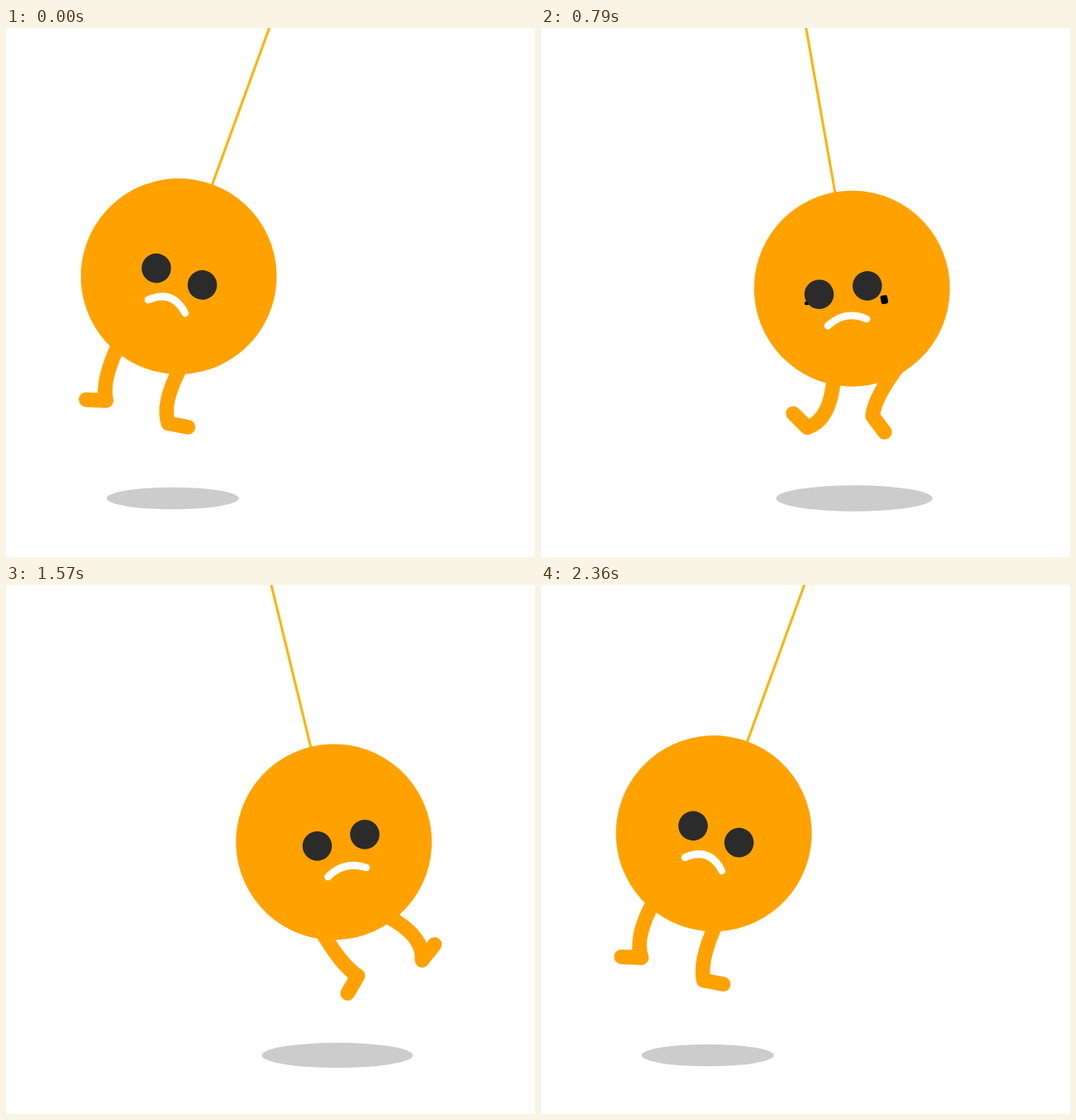
These frames come from a looping animation (640x640 px, 2.43 s). An HTML page with a canvas:

```html
<!DOCTYPE html>
<html lang="en">
<head>
<meta charset="utf-8">
<title>Swinging ball</title>
<style>
html, body { margin: 0; width: 100%; height: 100%; overflow: hidden; background: #fff; }
canvas { display: block; width: 100vw; height: 100vh; }
</style>
</head>
<body>
<canvas id="stage" width="640" height="640"></canvas>
<script>
const ctx = document.getElementById('stage').getContext('2d');

const LOOP = 2430, FPS = 14, STEPS = 34;
const PIVOT = { x: 320, y: -4 }, ROPE = 324.1, RADIUS = 118.5;
const ORANGE = '#ffa200', DARK = '#2b2b2b';

// Keys are [step, value] pairs
const SWING = [[0, -20.03], [17.25, 20.2], [33.3, -20.03]];
const STRIDE = [[0, 9], [9.5, -46], [17.2, 11], [26.5, 46.3], [33.4, 9]];

const clamp = (v, lo = 0, hi = 1) => Math.min(hi, Math.max(lo, v));
const smooth = x => x * x * (3 - 2 * x);
const wave = (step, shift) => Math.sin(2 * Math.PI * (step - shift) / STEPS);

// Symmetric cubic-bezier(h, 0, 1 - h, 1)
function ease(x, h = 0.48) {
  let lo = 0, hi = 1;
  for (let n = 0; n < 24; n++) {
    const s = (lo + hi) / 2, q = 1 - s;
    const bx = 3 * q * q * s * h + 3 * q * s * s * (1 - h) + s * s * s;
    if (bx < x) lo = s; else hi = s;
  }
  return smooth((lo + hi) / 2);
}

function track(keys, step) {
  for (let n = 1; n < keys.length; n++) {
    const [a, from] = keys[n - 1], [b, to] = keys[n];
    if (step <= b) return from + (to - from) * ease((step - a) / (b - a));
  }
  return keys[keys.length - 1][1];
}

function stroke(color, width, path) {
  ctx.strokeStyle = color;
  ctx.lineWidth = width;
  ctx.beginPath();
  path();
  ctx.stroke();
}

function ellipse(x, y, rx, ry, color) {
  ctx.fillStyle = color;
  ctx.beginPath();
  ctx.ellipse(x, y, rx, ry, 0, 0, 2 * Math.PI);
  ctx.fill();
}

function pill(x, y, w, h, r, color) {
  ctx.fillStyle = color;
  ctx.beginPath();
  ctx.roundRect(x - w / 2, y - h / 2, w, h, r);
  ctx.fill();
}

function shadow(step, angle) {
  const [, [mid], [end]] = SWING;
  const part = step < mid ? step / mid : (step - mid) / (end - mid);
  const rx = 98 - 18 * smooth(clamp(Math.abs(2 * part - 1)));
  ellipse(320 + 5.91 * angle, 569, rx, rx / 6, '#ccc');
}

// The knee sits low on the line from hip to ankle, pushed sideways by bend
function leg(side, stride, bend) {
  const hx = 40 * side, hy = 101;
  const dx = stride, dy = 71 - 0.0088 * stride * stride;
  const ax = hx + dx, ay = hy + dy, len = Math.hypot(dx, dy);
  const kx = hx + 0.7 * dx + bend * dy / len;
  const ky = hy + 0.7 * dy - bend * dx / len;
  const turn = ((side < 0 ? 175.5 : 3.8) - 1.4 * stride) * Math.PI / 180;
  stroke(ORANGE, 17.7, () => {
    ctx.moveTo(hx, hy);
    ctx.quadraticCurveTo(kx, ky, ax, ay);
    ctx.lineTo(ax + 24.3 * Math.cos(turn), ay + 24.3 * Math.sin(turn));
  });
}

function tear(x, side, age) {
  if (age <= 0 || age >= 7) return;
  const size = clamp((7 - age) / 2);
  const h = Math.min(10.5, 4 + 2.1 * age) * size;
  pill(x + side * (15 + 0.7 * age), 7 + 4 * age, 8.5 * size, h, Math.min(2.5, h / 2), '#000');
}

function face(step, angle) {
  const shift = -11.7 * wave(step, 0.35);
  const left = shift - 29.6, right = shift + 29.6;
  tear(right, 1, step - 7.75);
  tear(left, -1, step - 10.75);

  const h = 11 + 24.6 * clamp(Math.abs(step - 8) / 2);
  for (const x of [left, right]) pill(x, 0, 35.6, h, h / 2, DARK);

  const mx = shift - 2, my = 39.3, depth = 8.9 - 0.115 * angle;
  stroke('#fff', 8.8, () => {
    ctx.moveTo(mx - 23.8, my);
    ctx.quadraticCurveTo(mx, my - 2 * depth, mx + 23.8, my);
  });
}

function draw(step) {
  const angle = track(SWING, step), rad = angle * Math.PI / 180;
  const stride = track(STRIDE, step);
  ctx.fillStyle = '#fff';
  ctx.fillRect(0, 0, 640, 640);
  ctx.lineCap = ctx.lineJoin = 'round';
  shadow(step, angle);

  ctx.save();
  ctx.translate(PIVOT.x, PIVOT.y);
  ctx.rotate(-rad);
  stroke('#ffb200', 3, () => {
    ctx.moveTo(0, 0);
    ctx.lineTo(0, ROPE - RADIUS + 4);
  });
  ctx.translate(0, ROPE);
  leg(-1, stride, 21 * wave(step, 3));
  leg(1, stride, 21 * wave(step, 13.2));
  ellipse(0, 0, RADIUS, RADIUS, ORANGE);
  face(step, angle);
  ctx.restore();
}

// Motion is held on 14 steps per second
function tick() {
  const t = performance.now() % LOOP;
  draw(Math.min(STEPS - 1, Math.floor((t + 4.9) * FPS / 1000)));
  requestAnimationFrame(tick);
}
tick();
</script>
</body>
</html>
```
